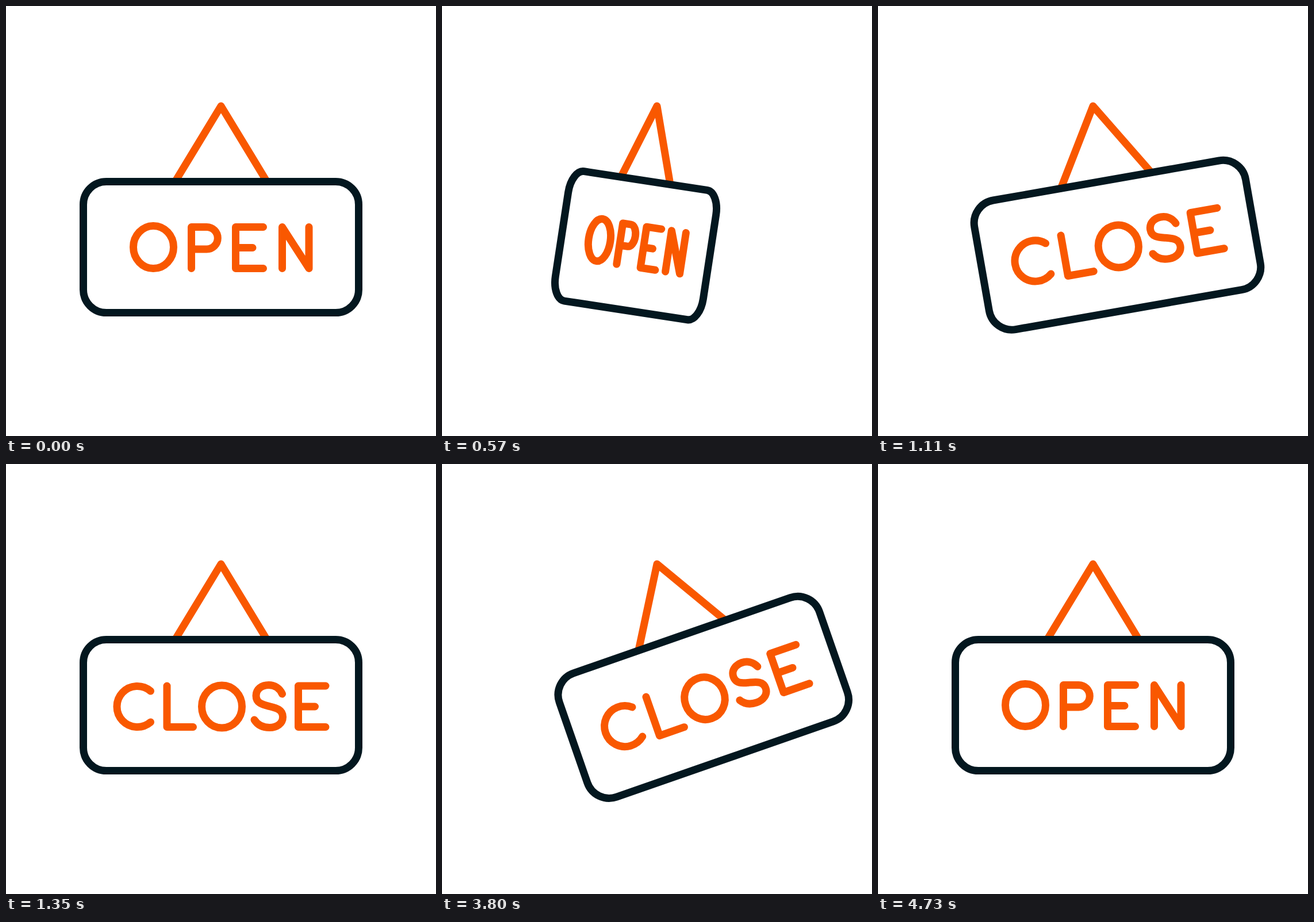
Write an HTML page that moves like this. It is 748x748 px and loops after 5760 ms.

```html
<!DOCTYPE html>
<html lang="en">
<head>
<meta charset="utf-8">
<title>Open / Close sign</title>
<style>
  html, body { margin: 0; height: 100%; overflow: hidden; background: #fff; }
  svg { display: block; width: 100vw; height: 100vh; }
  g { fill: none; stroke: #f95800; stroke-width: 13; stroke-linecap: round; stroke-linejoin: round; }
  path, rect, ellipse { vector-effect: non-scaling-stroke; }
  rect { stroke: #03171f; }
</style>
</head>
<body>
<svg viewBox="0 0 748 748">
  <g id="sign">
    <path d="M294.5 305L374 174L453.5 305"/>
    <rect x="134.5" y="305.5" width="479" height="228" rx="40"/>
    <g id="open">
      <ellipse cx="256.5" cy="419.5" rx="35" ry="37"/>
      <path d="M322.5 456.5V384.5H349a19.3 19.3 0 0 1 0 38.6H322.5"/>
      <path d="M447.5 384.5H399.5V456.5H447.5M399.5 420.5H429"/>
      <path d="M480.5 456.5V384.5L527 456.5V384.5"/>
    </g>
    <g id="close">
      <path d="M251.5 395A35.5 35.5 0 1 0 251.5 449"/>
      <path d="M280 386V457.5H325.5"/>
      <ellipse cx="375.5" cy="422" rx="35" ry="37"/>
      <path d="M480.5 400C476 390 467 384.5 457 384.5C445 384.5 435 391.5 435 403C435 416 446 418.5 458 421.5S481.5 427 481.5 440C481.5 452 470.500 458.5 458.5 458.5C446 458.5 437 453 432 445"/>
      <path d="M556 386H508.500V457.5H556M508.500 422H537.5"/>
    </g>
  </g>
</svg>
<script>
const LOOP = 5760, STEP = 30, TURN = 1350, BACK = 3380;
const PEAK = 420, MID = TURN / 2, SWING = 19.2;
const [sign, open, close] = ['sign', 'open', 'close'].map(id => document.getElementById(id));

// Cubic Bezier easing from (0,0) to (1,1), flat at both ends
function ease(x, x1, x2) {
  let lo = 0, hi = 1, p;
  for (let i = 0; i < 24; i++) {
    p = (lo + hi) / 2;
    const q = 1 - p;
    if (3 * p * q * q * x1 + 3 * p * p * q * x2 + p ** 3 < x) lo = p; else hi = p;
  }
  return p * p * (3 - 2 * p);
}

// Position within the turn: forward, hold, then the same turn backward
function turnTime(t) {
  if (t < TURN) return Math.floor(t / STEP) * STEP;
  if (t < BACK) return TURN;
  return Math.max(0, Math.ceil((BACK + TURN - t) / STEP) * STEP);
}

function draw(now) {
  const t = turnTime(now % LOOP);
  const closed = t > MID;
  const h = closed ? TURN - t : t;   // the second half mirrors the first
  const tilt = h === 0 ? 0 : h < PEAK
    ? SWING * ease(h / PEAK, .67, .5)
    : SWING * (1 - 2 * ease((h - PEAK) / (TURN - 2 * PEAK), .094, .906));
  const width = h < PEAK ? 1 : Math.max(.01, 1 - ((h - PEAK) / (MID - PEAK)) ** 1.475);
  sign.setAttribute('transform',
    `rotate(${closed ? -tilt : tilt} 374 174) translate(374) scale(${width} 1) translate(-374)`);
  open.style.display = closed ? 'none' : '';
  close.style.display = closed ? '' : 'none';
}

const start = performance.now();
function tick() {
  draw(performance.now() - start);
  requestAnimationFrame(tick);
}
tick();
</script>
</body>
</html>
```
